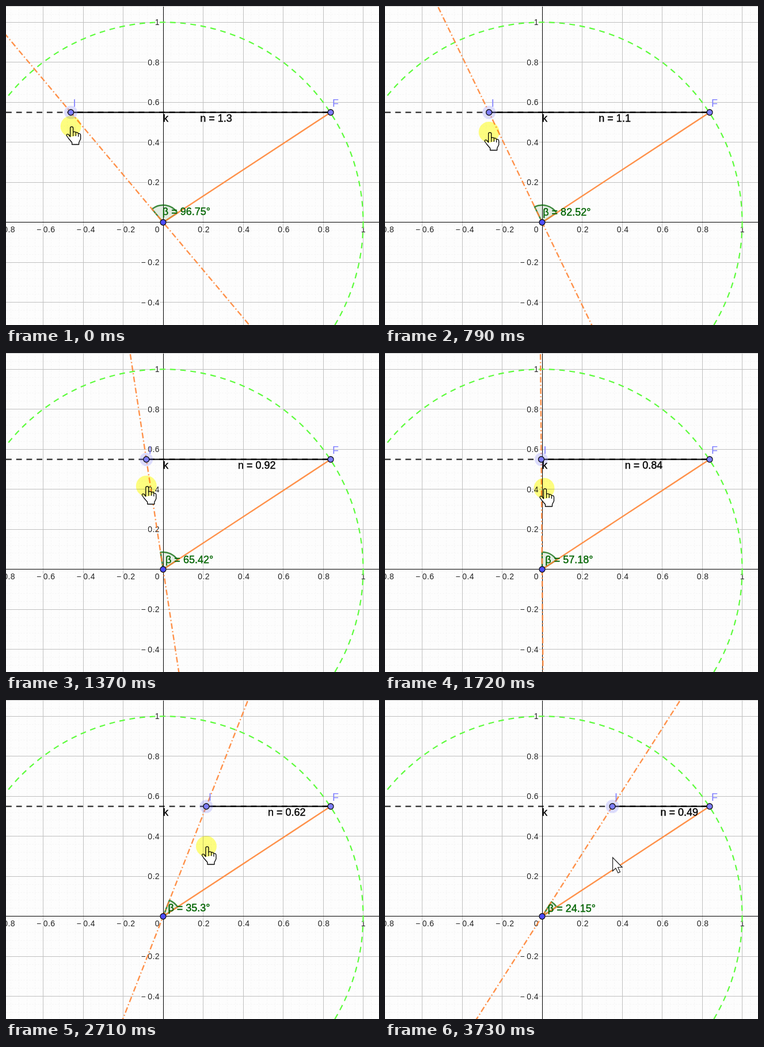
These frames come from a looping animation (648 by 554 pixels, 3.98 s). An HTML page:

```html
<!DOCTYPE html>
<html lang="en">
<head>
<meta charset="utf-8">
<title>Angle and segment</title>
<style>
  html, body { margin: 0; width: 100%; height: 100%; overflow: hidden; background: #fdfdfd; }
  svg { display: block; width: 648px; height: 554px; font: 18px "Liberation Sans", Arial, sans-serif; }
  .grid { shape-rendering: crispEdges; }
  .ticks text { font-size: 14px; letter-spacing: .4px; fill: #222; stroke: #fdfdfd; stroke-width: 4px; paint-order: stroke; }
  .bold { stroke-width: .4px; }
  .dash { stroke-dasharray: 9.85 7.88; }
  .dashdot { stroke-dasharray: 9.85 3.94 1.97 3.94; }
  .dot { stroke: #111; stroke-width: 1.3px; }
</style>
</head>
<body>
<svg viewBox="0 0 648 554">
  <g id="grid" class="grid"></g>
  <g id="ticks" class="ticks"></g>
  <path id="wedge" fill="#006400" fill-opacity=".1" stroke="#006400" stroke-opacity=".75" stroke-width="2.5" stroke-linejoin="round"/>
  <circle class="dash" cx="273" cy="375.75" r="347.5" fill="none" stroke="#5dfc3c" stroke-width="2.2"/>
  <g fill="none" stroke="#ff8637" stroke-opacity=".9" stroke-width="2.4">
    <path id="ray" class="dashdot"/>
    <path d="M273 375.75L564 184.75"/>
  </g>
  <path class="dash" d="M0 184.75H564" stroke="#000" stroke-opacity=".75" stroke-width="2.4"/>
  <path id="seg" stroke="#000" stroke-opacity=".85" stroke-width="2.6"/>
  <g id="point">
    <circle r="11.5" fill="#7d7dff" fill-opacity=".25"/>
    <circle class="dot" r="5" fill="#7d7dff"/>
    <text x="4" y="-9.75" fill="#7d7dff">I</text>
  </g>
  <circle class="dot" cx="564" cy="184.75" r="5" fill="#7d7dff"/>
  <circle class="dot" cx="273" cy="375.75" r="5" fill="#4d4dff"/>
  <text x="567" y="175" fill="#7d7dff">F</text>
  <g class="bold" stroke="#000">
    <text x="273" y="201">k</text>
    <text id="length" y="201"></text>
  </g>
  <text id="angle" class="bold" fill="#006400" stroke="#006400"></text>
  <g id="hand">
    <path d="M-1 18V3Q-1 .7 1.5 .7T4 3V10Q6 8.5 9 10.5Q12 9.8 13 12.5Q17 12 17 15.5V22L14 28V31.5H2V28L-4 21L-7.5 16Q-7.5 12.5 -4 14Z" fill="#fff" stroke="#000" stroke-width="1.3" stroke-linejoin="round"/>
    <path d="M4 10V17M8.7 11V17M13 13V18" stroke="#000" stroke-width="1.2"/>
  </g>
  <circle id="glow" r="18" fill="#ffff80" style="mix-blend-mode:multiply"/>
  <path id="arrow" d="M.5 .5V24L5.8 19L9.8 27.3L13.4 25.6L9.6 17.5H17Z" fill="#fff" stroke="#222" stroke-width="1.2"/>
</svg>
<script>
const LOOP = 3980, OX = 273, OY = 375.75, UNIT = 347.5, FX = 564, LY = 184.75;
const H = OY - LY, RAD = Math.PI / 180, BASE = 33.27;
const $ = id => document.getElementById(id);
const set = (el, attrs) => { for (const k in attrs) el.setAttribute(k, attrs[k]); };
const make = (parent, tag, attrs, text = "") => {
  const el = document.createElementNS("http://www.w3.org/2000/svg", tag);
  set(el, attrs);
  el.textContent = text;
  parent.append(el);
};

function drawGrid() {
  const pixel = v => Math.floor(v) + .5;
  const lines = (step, stroke, dash) => {
    let d = "";
    for (let x = OX % step; x < 648; x += step) d += `M${pixel(x + .01)} 0V554`;
    for (let y = OY % step; y < 554; y += step) d += `M0 ${pixel(y)}H648`;
    make($("grid"), "path", { d, stroke, "stroke-dasharray": dash });
  };
  lines(UNIT / 25, "#f6f6f6", "3 2");
  lines(UNIT / 5, "#c0c0c0", "none");
  make($("grid"), "path", { d: `M${pixel(OX)} 0V554M0 ${pixel(OY)}H648`, stroke: "#000" });
  make($("grid"), "path", { d: "M0 .5H648", stroke: "#ccc" });

  const label = (x, y, s) => make($("ticks"), "text", { x, y, "text-anchor": "end" }, s);
  const name = i => (i < 0 ? "−\u2009" : "") + Math.abs(i) / 5;
  for (let i = -4; i <= 5; i++) {
    const gap = i < 0 ? 21 : i === 5 ? 4.5 : 11.5;
    if (i) label(OX + i * UNIT / 5 + gap, 393, name(i));
    if (i && i > -3) label(267, OY - i * UNIT / 5 + 5, name(i));
  }
  label(267, 393, "0");
}

// Each leg: start, end, steps, angle, cursor height, cursor shift
const legs = [
  [40, 540, 11, 86.79, 215.5, 0],
  [590, 790, 5, 82.52, 219, 0],
  [860, 1070, 6, 76.19, 224, 0],
  [1120, 1370, 6, 65.42, 231, 0],
  [1440, 1620, 5, 57.18, 234, 0],
  [1670, 1720, 2, 57.18, 235, 5],
  [1870, 2160, 6, 47.83, 241, 1],
  [2210, 2340, 4, 43.05, 246, 0],
  [2410, 2710, 7, 35.3, 254, 0],
  [2740, 2880, 4, 30.77, 261, 0],
  [2960, 3070, 3, 28.62, 266, 0],
  [3120, 3420, 7, 24.15, 273, 0]
];
const angleToX = a => OX + H / Math.tan((a + BASE) * RAD);
const xToAngle = x => Math.atan2(H, x - OX) / RAD - BASE;

function pose(t) {
  let now = [angleToX(96.75), 209, 0];
  for (const [start, end, steps, a, y, shift] of legs) {
    if (t < start) break;
    const done = Math.min(steps, 1 + Math.floor((t - start) * (steps - 1) / (end - start) + 1e-6));
    now = [angleToX(a), y, shift].map((v, i) => now[i] + (v - now[i]) * done / steps);
  }
  return now;
}

function render(t) {
  const [x, y, shift] = pose(t), beta = xToAngle(x);
  const at = (px, py) => ({ transform: `translate(${px} ${py})` });
  const onRay = py => `${OX + (x - OX) * (OY - py) / H} ${py}`;
  const onArc = a => `${OX + 30 * Math.cos(a * RAD)} ${OY - 30 * Math.sin(a * RAD)}`;

  set($("ray"), { d: `M${onRay(2)}L${onRay(556)}` });
  set($("seg"), { d: `M${x} ${LY}H${FX}` });
  set($("point"), at(x, LY));
  set($("wedge"), { d: `M${OX} ${OY}L${onArc(BASE)}A30 30 0 0 0 ${onArc(BASE + beta)}Z` });

  set($("length"), { x: (x + FX) / 2 - 1 });
  $("length").textContent = "n = " + +((FX - x) / UNIT).toFixed(2);
  const mid = (BASE + beta / 2) * RAD;
  set($("angle"), { x: 269 + 19.7 * Math.cos(mid), y: 381.5 - 18.5 * Math.sin(mid) });
  $("angle").textContent = `β = ${+beta.toFixed(2)}°`;

  const free = t >= 3730;
  for (const id of ["hand", "glow", "arrow"]) {
    set($(id), at(x + shift, y));
    set($(id), { visibility: free === (id === "arrow") ? "visible" : "hidden" });
  }
}

drawGrid();
const began = performance.now();
function tick() {
  render((performance.now() - began) % LOOP);
  requestAnimationFrame(tick);
}
tick();
</script>
</body>
</html>
```
